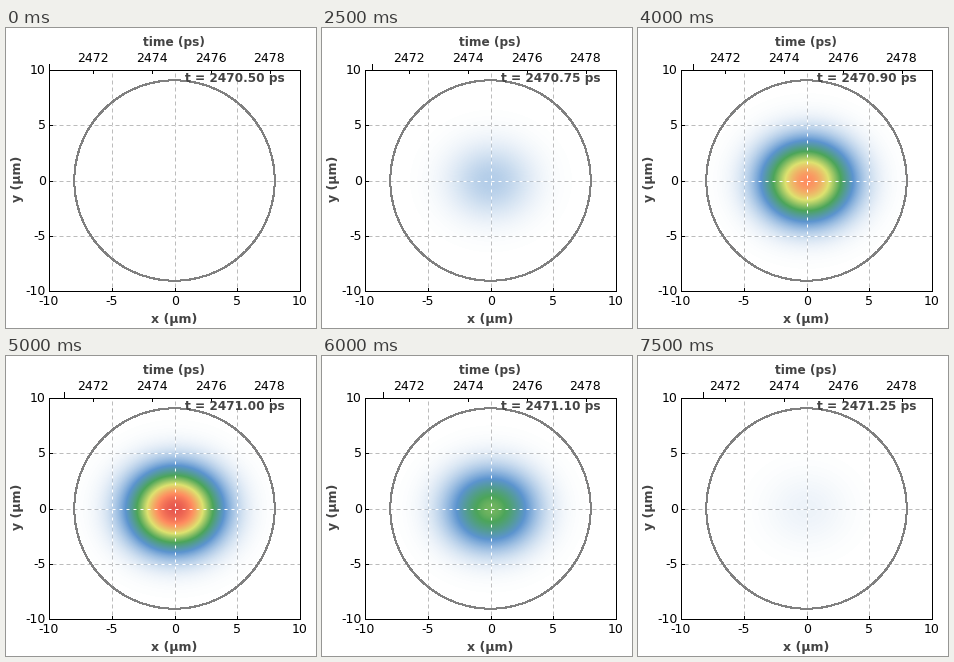
Animation of 310x300 px, one loop 8000 ms. Source, as a matplotlib script:

```python
import matplotlib.pyplot as plt
import numpy as np
from matplotlib.animation import FuncAnimation
from matplotlib.colors import LinearSegmentedColormap
from matplotlib.patches import Circle

W, H, DPI = 310, 300, 100
LEFT, RIGHT, TOP, BOTTOM = 43, 294, 42, 263
FRAMES, INTERVAL = 16, 500
T0, T1, DT = 2470.5, 2479.0, 0.05
PEAK, RATE, WAIST = 2470.97, 47, 3.25
PX = 72 / DPI
LABEL = "#444444"

plt.rcParams["font.family"] = "DejaVu Sans"
fig = plt.figure(figsize=(W / DPI, H / DPI), dpi=DPI, facecolor="white")
ax = fig.add_axes([0, 0, 1, 1])
ax.axis("off")

cmap = LinearSegmentedColormap.from_list("beam", [
    (0, "#ffffff"), (0.22, "#5c94cf"), (0.4, "#4ca55a"),
    (0.6, "#dee270"), (0.8, "#ff8c60"), (1, "#e14b4b")], N=512)


def to_x(v):
    return LEFT + round((v + 10) / 20 * (RIGHT - LEFT))


def to_y(v):
    return TOP + int((10 - v) / 20 * (BOTTOM - TOP) + 0.5)


def time_x(t):
    return LEFT + round((t - T0) / (T1 - T0) * (RIGHT - LEFT))


def line(x0, y0, x1, y1, color="black", z=5, **kw):
    # Whole pixel numbers: snapping moves the stroke to the pixel centres
    return ax.plot([x0, x1], [y0, y1], color=color, lw=PX, zorder=z, snap=True,
                   solid_capstyle="projecting", dash_capstyle="butt", **kw)[0]


def text(x, y, s, size=12.5, ha="center", **kw):
    return ax.text(x, y, s, fontsize=size * PX, ha=ha, zorder=6,
                   **{"va": "baseline", **kw})


def label(x, y, s, size=12.1, **kw):
    return text(x, y, s, size, color=LABEL, weight="bold", **kw)


def grid(x0, y0, x1, y1):
    # White dashes over a grey line: grey on paper, white on the beam
    line(x0, y0, x1, y1, "#bcbcbc", 1)
    line(x0, y0, x1, y1, "white", 3, linestyle=(0, (3, 4)))


for v in (-10, -5, 0, 5, 10):
    x, y = to_x(v), to_y(v)
    text(x, 277, str(v))
    text(40, y + 4, str(v), ha="right")
    if abs(v) < 10:
        grid(x, TOP, x, BOTTOM)
        grid(LEFT, y, RIGHT, y)
        line(x, BOTTOM - 3, x, BOTTOM)
        line(LEFT, y, LEFT + 3, y)

for t in range(2472, 2479, 2):
    x = time_x(t)
    line(x, TOP, x, TOP + 3)
    text(x - .5, 34, str(t))

for y in (TOP, BOTTOM):
    line(LEFT, y, RIGHT, y)
for x in (LEFT, RIGHT):
    line(x, TOP, x, BOTTOM)

label(168, 18, "time (ps)")
label(168.5, 295, "x (µm)", 12.5)
label(18, 150.5, "y (µm)", 12.5, ha="right", va="center", rotation=90)
ax.add_patch(Circle((168.5, 152.5), 100.2, fill=False, ec="#808080",
                    lw=PX, zorder=4, antialiased=False))

xs = np.linspace(-10, 10, RIGHT - LEFT + 1)
ys = np.linspace(10, -10, BOTTOM - TOP + 1)
profile = np.exp(-(xs[None, :] ** 2 + ys[:, None] ** 2) / WAIST ** 2)


def beam(t):
    v = profile * np.exp(-RATE * (t - PEAK) ** 2)
    rgba = cmap(v)
    # Hide the grey grid gradually while keeping the colour seen on white
    alpha = np.clip(10 * v, 1e-6, 1)
    rgba[..., :3] = np.clip(1 - (1 - rgba[..., :3]) / alpha[..., None], 0, 1)
    rgba[..., 3] = np.where(v < 0.002, 0, alpha)
    return rgba


image = ax.imshow(beam(T0), extent=(LEFT, RIGHT + 1, BOTTOM + 1, TOP),
                  aspect="auto", interpolation="nearest", zorder=2)
marker = line(LEFT, 36, LEFT, TOP)
clock = label(179, 54, "", ha="left")
ax.set_xlim(0, W)
ax.set_ylim(H, 0)


def update(i):
    t = T0 + DT * i
    x = time_x(t)
    image.set_data(beam(t))
    marker.set_xdata([x, x])
    clock.set_text(f"t = {t:.2f} ps")
    return image, marker, clock


anim = FuncAnimation(fig, update, frames=FRAMES, interval=INTERVAL,
                     repeat=True, repeat_delay=0, blit=False)
plt.show()
```
